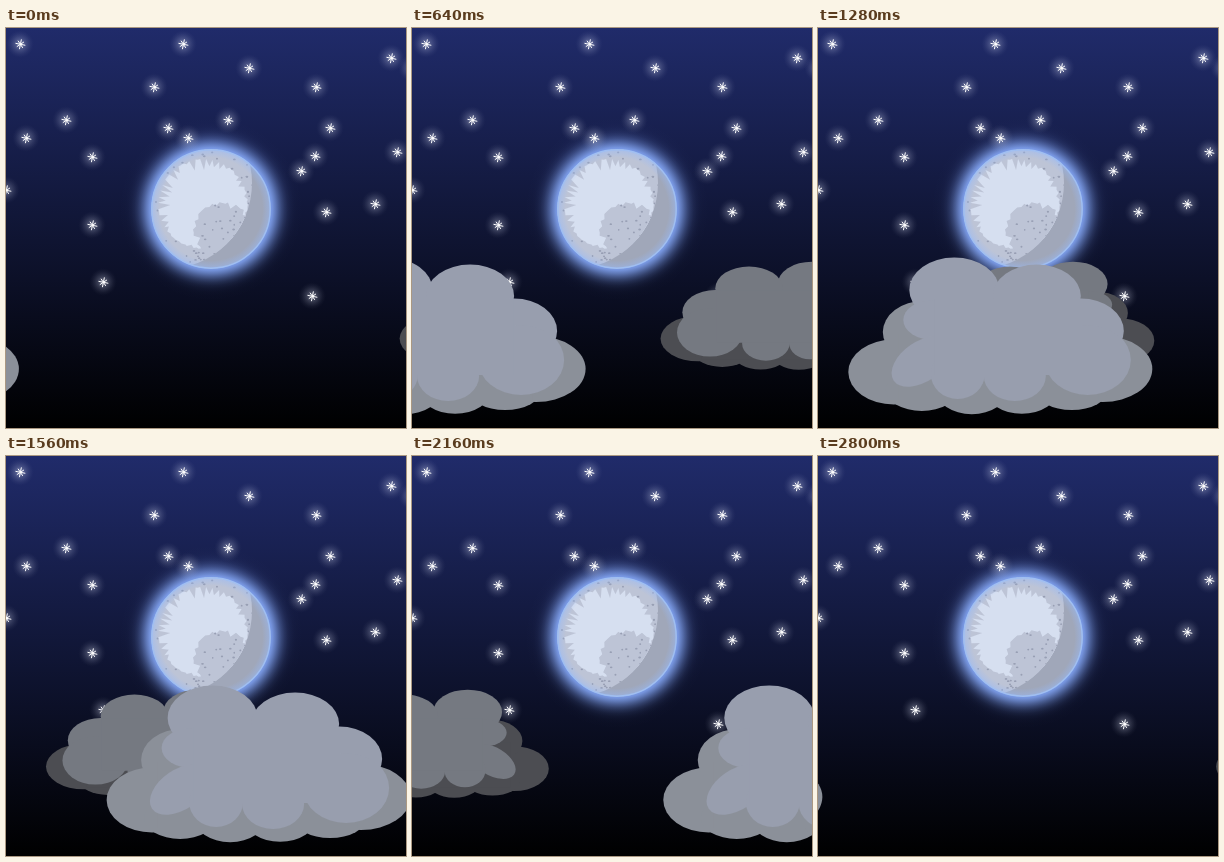
These frames come from a looping animation (400 px wide and 400 px high, 2840 ms). An HTML page with a canvas:

```html
<!DOCTYPE html>
<html lang="en">
<head>
<meta charset="utf-8">
<title>Night clouds</title>
<style>
html, body { margin: 0; width: 100%; height: 100%; overflow: hidden; background: #000; }
canvas { display: block; width: 400px; height: 400px; }
</style>
</head>
<body>
<canvas id="stage" width="400" height="400"></canvas>
<script>
const SIZE = 400, LOOP = 2840, STEP = 40, TAU = Math.PI * 2;
const CLOUD_WIDTH = 303;
const stage = document.getElementById('stage').getContext('2d');

const STARS = [
  [14, 16], [177, 16], [243, 40], [385, 30], [148, 59], [310, 59], [60, 92], [162, 100],
  [222, 92], [324, 100], [20, 110], [182, 110], [86, 129], [309, 128], [295, 143],
  [391, 124], [0, 162], [320, 184], [369, 176], [86, 197], [97, 254], [306, 268], [406, 40]
];

function seeded(seed) {
  return () => (seed = (seed * 16807) % 2147483647) / 2147483647;
}

function oval(c, x, y, rx, ry = rx, tilt = 0) {
  c.beginPath();
  c.ellipse(x, y, rx, ry, tilt, 0, TAU);
  c.fill();
}

// Radial gradient from radius r0 to r1 whose alpha follows fade(0..1)
function glow(c, x, y, r0, r1, rgb, fade) {
  const g = c.createRadialGradient(x, y, r0, x, y, r1);
  for (let k = 0; k <= 12; k++) g.addColorStop(k / 12, `rgba(${rgb},${fade(k / 12)})`);
  c.fillStyle = g;
  oval(c, x, y, r1);
}

function drawSky(c) {
  const g = c.createLinearGradient(0, 0, 0, SIZE);
  g.addColorStop(0, '#202b6a');
  g.addColorStop(1, '#000');
  c.fillStyle = g;
  c.fillRect(0, 0, SIZE, SIZE);
}

function drawStar(c, x, y) {
  glow(c, x, y, 0, 14, '225,230,250', f => 0.45 * (1 - f) ** 1.6);
  c.strokeStyle = '#fff';
  c.beginPath();
  for (let i = 0; i < 8; i++) {
    const a = i * TAU / 8 + 0.2, r = i % 2 ? 4.3 : 5;
    c.moveTo(x + 0.4, y + 0.3);
    c.lineTo(x + 0.4 + r * Math.cos(a), y + 0.3 + r * Math.sin(a));
  }
  c.stroke();
}

// Oval with a toothed rim; depth(angle) sets how far the teeth cut in
function ragged(c, x, y, rx, ry, teeth, depth, random) {
  c.beginPath();
  for (let i = 0; i < teeth * 2; i++) {
    const a = (i + random() * 0.6) * Math.PI / teeth;
    const cut = i % 2 ? depth(a) * random() : 0;
    c.lineTo(x + (rx - cut) * Math.cos(a), y + (ry - cut) * Math.sin(a));
  }
  c.closePath();
  c.fill();
}

function drawMoon(c) {
  const x = 205, y = 181, r = 59.5, random = seeded(77);
  const base = '#bdc4d6';
  glow(c, x, y, r - 1, 95, '135,170,250', f => 0.95 * Math.exp(-((f * 2.5) ** 2)) * (1 - f));
  c.save();
  c.fillStyle = '#a0a7b9';
  oval(c, x, y, r);
  c.clip();
  c.fillStyle = base;
  oval(c, 160, 155, 86);
  c.clip();

  c.fillStyle = '#d6dff0';
  ragged(c, 197, 176, 45, 45, 46, a => 8 + 7 * Math.cos(a + 2.3), random);
  c.fillStyle = base;
  ragged(c, 217, 202, 30, 28, 22, () => 6, random);

  c.fillStyle = '#989fb4';
  for (let i = 0; i < 170; i++) {
    const a = random() * TAU, d = 57 * Math.sqrt(random());
    const px = x + d * Math.cos(a), py = y + d * Math.sin(a);
    const onPlain = Math.hypot(px - 197, py - 176) > 45 || Math.hypot(px - 217, py - 202) < 26;
    if (onPlain) oval(c, px, py, 0.8 + random() * 0.6, 0.9);
  }
  c.restore();

  glow(c, x, y, r - 8, r, '150,185,250', f => 0.5 * f);
  c.beginPath();
  c.arc(x, y, r - 0.3, 0, TAU);
  c.strokeStyle = '#a0bff2';
  c.lineWidth = 1.4;
  c.stroke();
  c.lineWidth = 1;
}

function drawCloud(c, shade, light) {
  c.fillStyle = shade;
  oval(c, 45, 344, 45.5, 32.5);
  oval(c, 75, 304, 41, 31);
  oval(c, 254, 341, 49.5, 33);
  for (let i = 0; i < 4; i++) {
    oval(c, 73 + 50 * i, 362, 36, 20.5 + 4 * Math.sin((i + 0.1) * 1.05));
  }
  c.fillRect(50, 306, 200, 66);

  c.fillStyle = light;
  oval(c, 105.5, 262, 45, 32.5);
  oval(c, 188, 268, 44, 31.5);
  oval(c, 232, 303, 43, 32.5);
  oval(c, 239, 332, 43, 35);
  oval(c, 85, 292, 30.5, 20);
  oval(c, 73, 333.5, 34, 20, -0.6);
  for (let i = 0; i < 2; i++) oval(c, 109 + 57 * i, 346 + 2 * i, 27 + 4 * i, 25);
  c.fillRect(86, 271, 145, 76);
}

function drawFrontCloud(c, left) {
  c.save();
  c.translate(left, 0);
  drawCloud(c, '#8b9099', '#989eae');
  c.restore();
}

// The far cloud is the near one mirrored and shrunk
function drawBackCloud(c, left) {
  c.save();
  c.translate(left + CLOUD_WIDTH * 0.766, 234);
  c.scale(-0.766, 0.69);
  c.translate(0, -230);
  drawCloud(c, '#4c4d52', '#757981');
  c.restore();
}

function makeBackdrop() {
  const canvas = document.createElement('canvas');
  canvas.width = canvas.height = SIZE;
  const c = canvas.getContext('2d');
  drawSky(c);
  drawMoon(c);
  STARS.forEach(([x, y]) => drawStar(c, x, y));
  return canvas;
}

const backdrop = makeBackdrop();

// Time since a cloud's latest entry; each re-enters just before the loop ends
const travel = (t, period) => t < 2780 ? t : t - period;

function render(now) {
  const t = Math.floor((now % LOOP) / STEP) * STEP;
  stage.drawImage(backdrop, 0, 0);
  drawBackCloud(stage, 394 - 0.2267 * travel(t, 2820));
  drawFrontCloud(stage, 12.4 - CLOUD_WIDTH + 0.2511 * travel(t, 2834));
}

function tick() {
  render(performance.now());
  requestAnimationFrame(tick);
}
tick();
</script>
</body>
</html>
```
